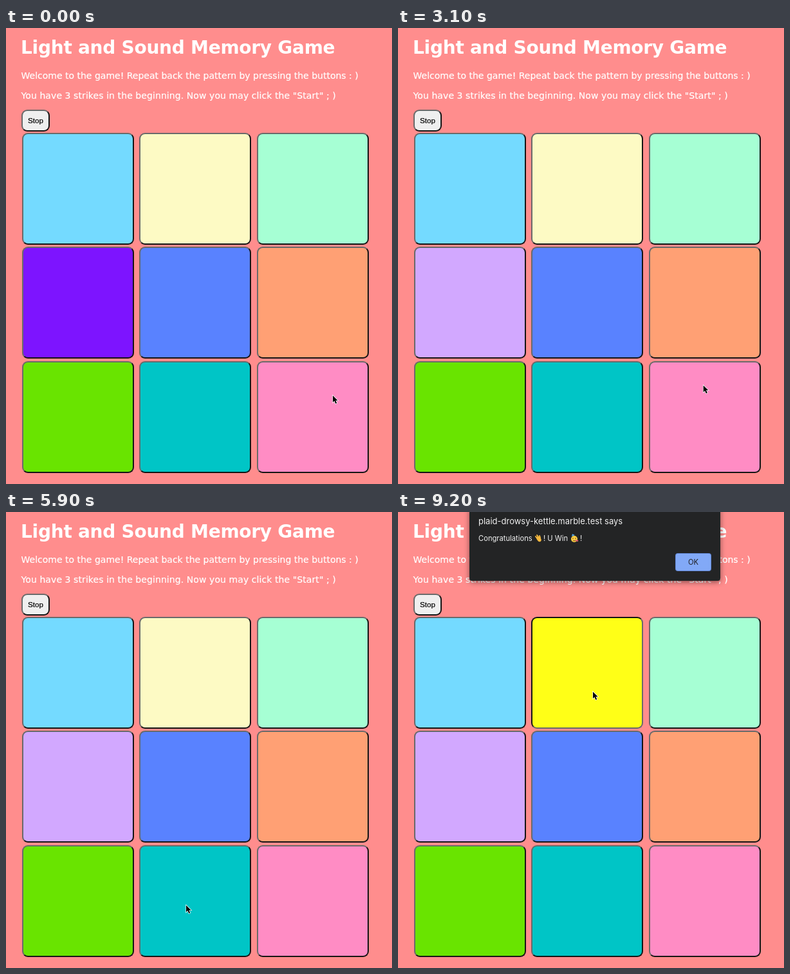
These frames come from a looping animation (600 px wide and 709 px high, 9300 ms). An HTML page:

```html
<!DOCTYPE html>
<html lang="en">
<head>
<meta charset="utf-8">
<title>Memory game</title>
<style>
  html, body { margin: 0; width: 600px; height: 709px; overflow: hidden; background: #ff8d8d; }
  svg { position: absolute; left: 0; top: 0; }
  .button {
    position: absolute; box-sizing: border-box; border: 2px solid;
    border-color: #6a6a6a #151515 #151515 #6a6a6a; border-radius: 9px;
  }
  .button.pressed { border-color: #151515 #6a6a6a #6a6a6a #151515; }
  #stop { left: 24px; top: 127px; width: 44px; height: 34px; background: #efefef; }
  #dialog {
    position: absolute; left: 111px; top: -8px; width: 390px; height: 115px;
    background: #232425; border-radius: 4px; box-shadow: 0 2px 9px #0007;
  }
  .page { font: 14px "DejaVu Sans", sans-serif; fill: #fff; stroke: #fff; stroke-width: .2; }
  .page .title { font-size: 28px; font-weight: bold; letter-spacing: -.26px; stroke: none; }
  .page .rules { letter-spacing: .08px; }
  .page .stop { font: 11.67px "Liberation Sans", sans-serif; fill: #000; stroke: #000; }
  .alert { font: 11.2px Inter, sans-serif; fill: #f1f1f1; }
</style>
</head>
<body>
<div id="board"></div>
<div id="stop" class="button"></div>
<svg class="page" width="600" height="709">
  <text class="title" x="23" y="40">Light and Sound Memory Game</text>
  <text x="23.5" y="79">Welcome to the game! Repeat back the pattern by pressing the buttons : )</text>
  <text class="rules" x="23.5" y="110">You have 3 strikes in the beginning. Now you may click the "Start" ; )</text>
  <text class="stop" x="34" y="148">Stop</text>
</svg>
<div id="alert">
  <div id="dialog"></div>
  <svg class="alert" width="600" height="120">
    <text x="125" y="19" font-size="13">plaid-drowsy-kettle.marble.test says</text>
    <text x="125" y="45">Congratulations</text>
    <text x="226" y="45">! U Win</text>
    <text x="283" y="45">!</text>
    <g stroke="#f5b83d" stroke-width="2" stroke-linecap="round">
      <ellipse cx="219" cy="42" rx="3" ry="4.5" transform="rotate(-35 219 42)" fill="#f5b83d" stroke="none"/>
      <path d="M217 42l-3-4M219 40l-3-4M221 40l-1-3"/>
    </g>
    <circle cx="274" cy="42" r="5" fill="#ffd044"/>
    <path d="M270 38l1-4 4 2z" fill="#57a9e8"/>
    <path d="M271 41h2m2 0h2m-5 3q2 2 4 0" fill="none" stroke="#70451c"/>
    <path d="M276 44l4 1" stroke="#e65c70" stroke-width="2"/>
    <rect x="431.5" y="64.5" width="55" height="27" rx="3" fill="#82a9f7" stroke="#6288d6"/>
    <text x="459" y="82" text-anchor="middle" style="fill:#202124">OK</text>
  </svg>
</div>
<svg id="cursor" width="12" height="17" viewBox="-2 -2 14 20">
  <path d="M0 0V12.5L2.8 9.8 5 14.8 7.3 13.8 5.1 9H9Z" fill="#000" stroke="#fff" stroke-width="1.6" paint-order="stroke"/>
</svg>
<script>
const LOOP = 9300, STEP = 100;
const PURPLE = 3, TEAL = 7, PINK = 8, YELLOW = 1;
const colors = ['#74daff', '#fdfac4', '#a6ffd4', '#d2a8ff', '#5982ff', '#ffa074', '#69e400', '#00c5c6', '#ff8cc4'];
const litColors = { [PURPLE]: '#7d14ff', [TEAL]: '#00ffff', [PINK]: '#ff1493', [YELLOW]: '#ffff17' };

// [button, from, to] for the pattern, then for the player's presses
const clues = [[PURPLE, 0, 700], [PINK, 1000, 1700], [YELLOW, 2100, 2800]];
const presses = [[PURPLE, 4200, 4400], [TEAL, 6000, 6200], [PURPLE, 7100, 7300], [PINK, 8400, 8600], [YELLOW, 9000, LOOP]];

// [time, x, y] of the pointer's tip
const path = [
  [0, 508, 571], [2900, 508, 571], [4000, 125, 389], [4500, 125, 389],
  [5700, 280, 611], [6300, 280, 611], [7000, 128, 430], [7400, 128, 430],
  [8200, 451, 555], [8600, 451, 555], [8900, 303, 279], [LOOP, 303, 279]
];

const $ = id => document.getElementById(id);
const buttons = colors.map((color, i) => {
  const el = document.createElement('div');
  el.className = 'button';
  el.style.cssText = `left:${25.1 + i % 3 * 182.3}px;top:${162.75 + Math.floor(i / 3) * 177.5}px;width:174px;height:174px`;
  return $('board').appendChild(el);
});

function pointerAt(t) {
  const i = path.findIndex(p => p[0] > t);
  const [t0, x0, y0] = path[i - 1], [t1, x1, y1] = path[i];
  const u = (t - t0) / (t1 - t0), k = u * u * (3 - 2 * u);
  return [x0 + (x1 - x0) * k, y0 + (y1 - y0) * k];
}

function draw(now) {
  const t = Math.floor(now % LOOP / STEP) * STEP;
  const active = (list, i) => list.some(([b, from, to]) => b === i && t >= from && t < to);
  buttons.forEach((el, i) => {
    const pressed = active(presses, i);
    el.style.background = pressed || active(clues, i) ? litColors[i] : colors[i];
    el.classList.toggle('pressed', pressed);
  });
  const [x, y] = pointerAt(t);
  $('cursor').style.transform = `translate(${x - 1.7}px,${y - 1.2}px)`;
  $('alert').style.display = t >= 9100 ? 'block' : 'none';
}

const start = performance.now();
function frame() {
  draw(performance.now() - start);
  requestAnimationFrame(frame);
}
frame();
</script>
</body>
</html>
```
